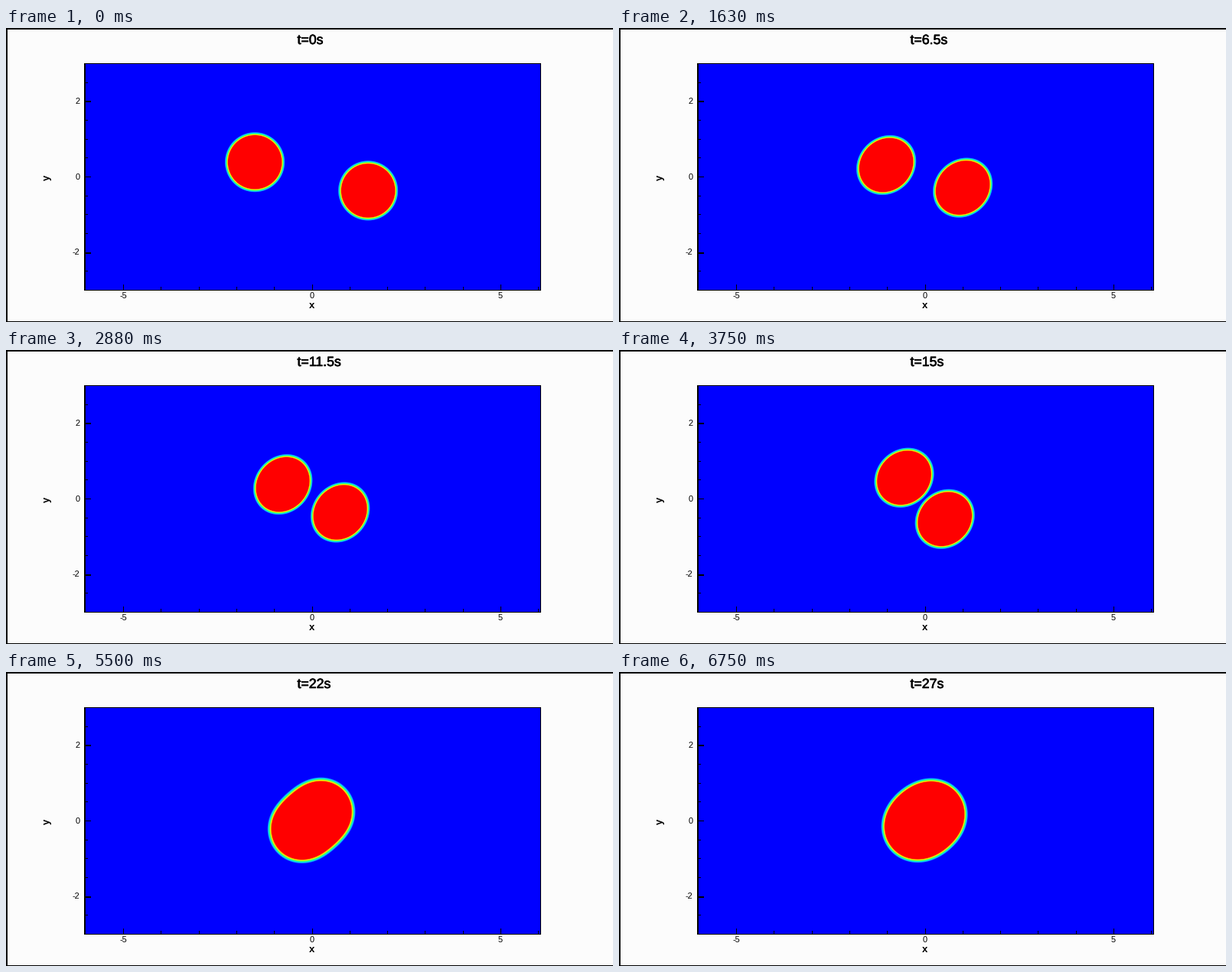
Animation, 793 px wide and 384 px high, one loop 6.87 s. Source, as a matplotlib script:

```python
import numpy as np
import matplotlib.pyplot as plt
from matplotlib.animation import FuncAnimation
from matplotlib.patches import Rectangle
from matplotlib.patheffects import withStroke

W, H, DPI = 793, 384, 100
LOOP_MS, STEPS, DT = 6870, 55, 0.5
LEFT, RIGHT, TOP, BOTTOM = 103, 698, 46, 342
CX, CY = 399.1, 193.8          # centre of the flow, in pixels
X0, Y0, UNIT = 399.5, 194, 49.3
R = 38.9                       # drop radius
T_MERGE = 18.5

# time, x offset, y offset (up), deformation, tilt in degrees
KEYS = np.array([
    (0, -74, 18.6, 0, 45),
    (2.5, -64.3, 16.5, 0.045, 45),
    (6.5, -50, 14.8, 0.064, 45),
    (11.5, -37.5, 18.2, 0.07, 49),
    (15, -26.6, 27, 0.066, 45),
    (18.5, 1.3, 39.3, 0.052, 37),
])
KEY_T, KEY_V = KEYS[:, 0], KEYS[:, 1:]
SLOPES = np.gradient(KEY_V, KEY_T, axis=0)

# colour ramp over the depth inside a drop, in pixels
DEPTH = [-0.6, 0.3, 1.0, 1.9, 2.9, 3.6, 4.2]
RAMP = np.array([(0, 0, 255), (20, 150, 255), (0, 235, 235), (60, 250, 110),
                 (240, 250, 0), (255, 140, 0), (255, 0, 0)]) / 255

GX, GY = np.meshgrid(np.arange(LEFT, RIGHT) + 0.5 - CX,
                     CY - np.arange(TOP, BOTTOM) - 0.5)


def drop_state(t):
    """Cubic Hermite through the key poses."""
    i = min(np.searchsorted(KEY_T, t, side="right") - 1, len(KEY_T) - 2)
    h = KEY_T[i + 1] - KEY_T[i]
    s = (t - KEY_T[i]) / h
    return ((2 * s**3 - 3 * s**2 + 1) * KEY_V[i]
            + (s**3 - 2 * s**2 + s) * h * SLOPES[i]
            + (3 * s**2 - 2 * s**3) * KEY_V[i + 1]
            + (s**3 - s**2) * h * SLOPES[i + 1])


def rotated(x, y, degrees):
    c, s = np.cos(np.radians(degrees)), np.sin(np.radians(degrees))
    return c * x + s * y, c * y - s * x


def drop_depth(x, y, deform, tilt):
    u, v = rotated(GX - x, GY - y, tilt)
    return R * (1 - np.hypot(u / (1 + deform), v / (1 - deform)) / R)


def pair_depth(t):
    x, y, deform, tilt = drop_state(t)
    return np.maximum(drop_depth(x, y, deform, tilt),
                      drop_depth(-x, -y, deform, tilt))


def merged_depth(t):
    """Hippopede of constant area: two touching circles relax to an oval."""
    age = t - T_MERGE
    b = 50.3 * (1 - np.exp(-age / 1.2))
    a = np.sqrt(4 * R**2 - b**2)
    angle = 40.5 + 47.5 / (1 + np.exp((age - 1.6) / 0.55))
    u, v = rotated(GX, GY, angle)
    r = np.hypot(u, v) + 1e-9
    c, s = u / r, v / r
    edge = np.sqrt((a * c)**2 + (b * s)**2)
    slope = (b**2 - a**2) * s * c / edge
    ring = 1 + 0.3 * (1 - np.exp(-age)) - 0.02 * age
    return (edge - r) * edge / np.hypot(edge, slope) / ring


def field(t):
    depth = pair_depth(t) if t <= T_MERGE else merged_depth(t)
    return np.stack([np.interp(depth, DEPTH, ch) for ch in RAMP.T], axis=-1)


fig = plt.figure(figsize=(W / DPI, H / DPI), dpi=DPI, facecolor="#fcfcfc")
ax = fig.add_axes([0, 0, 1, 1])
ax.set_xlim(0, W)
ax.set_ylim(H, 0)
ax.axis("off")


def bar(x, y, w, h):
    ax.add_patch(Rectangle((x, y), w, h, fc="black", lw=0, zorder=3))


def label(x, y, text, px, **kw):
    style = dict(ha="center", va="center", family="Liberation Sans")
    return ax.text(x, y, text, fontsize=px * 72 / DPI, **{**style, **kw})


image = ax.imshow(field(0), extent=(LEFT, RIGHT, BOTTOM, TOP), aspect="auto",
                  interpolation="nearest", zorder=1)
ax.set_xlim(0, W)
ax.set_ylim(H, 0)

# outer border and plot frame
bar(0, 0, W, 1.5)
bar(0, 0, 1.5, H)
bar(0, H - 1, W, 1)
bar(LEFT - 1, TOP, 1.5, BOTTOM - TOP + 1)
bar(LEFT - 1, BOTTOM - 0.5, RIGHT - LEFT + 2, 1.5)
bar(LEFT, TOP, RIGHT - LEFT, 0.6)
bar(RIGHT, TOP, 0.8, BOTTOM - TOP)

for n in range(-5, 7):
    size = 7 if n % 5 == 0 else 4
    bar(round(X0 + n * UNIT), BOTTOM - size, 1, size)
for n in range(-5, 6):
    major = n % 4 == 0
    bar(LEFT, round(Y0 - n * UNIT / 2), 8 if major else 4, 1)
for n in (-4, 4):
    bar(LEFT, round(Y0 - n * UNIT / 2), 8, 1.5)

for n in (-5, 0, 5):
    label(X0 + n * UNIT, 350, str(n), 11)
for n in (-2, 0, 2):
    label(96.5, Y0 + 0.5 - n * UNIT, str(n), 11, ha="right")
label(400, 363, "x", 13, weight="bold")
label(54, 195, "y", 13, weight="bold", rotation=90)

title = label(380.5, 21, "", 17.7, ha="left", va="baseline",
              path_effects=[withStroke(linewidth=0.45, foreground="black")])


def draw(step):
    t = step * DT
    image.set_data(field(t))
    title.set_text(f"t={t:g}s")
    return image, title


anim = FuncAnimation(fig, draw, frames=STEPS, interval=LOOP_MS / STEPS,
                     repeat=True, repeat_delay=0)
plt.show()
```
